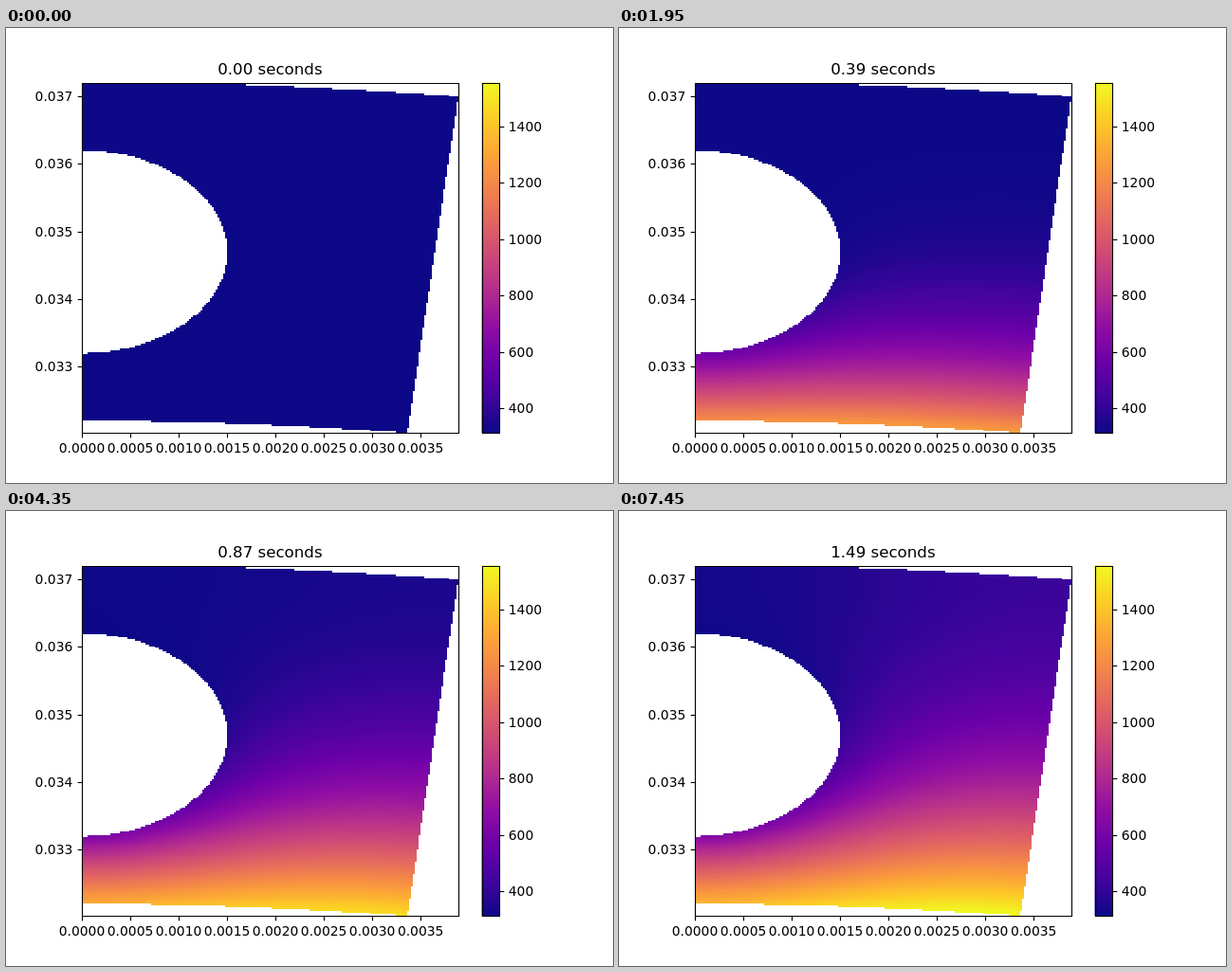
Animation of 640 by 480 pixels, one loop 7500 ms. Source, as an HTML page with a canvas:

```html
<!DOCTYPE html>
<html lang="en">
<head>
<meta charset="utf-8">
<title>Heat in a cooled wall</title>
<style>
  html, body { margin: 0; width: 100%; height: 100%; overflow: hidden; background: #fff; }
  canvas, svg { position: absolute; left: 0; top: 0; display: block; }
  text { font: 13.89px "DejaVu Sans", sans-serif; fill: #000; }
  #title { font-size: 16.67px; }
  path { fill: none; stroke: #000; stroke-width: 1.11; }
</style>
</head>
<body>
<canvas id="stage" width="640" height="480"></canvas>
<svg id="axes" width="640" height="480" viewBox="0 0 640 480"></svg>
<script>
const FRAMES = 150, STEP_MS = 50, LOOP_MS = FRAMES * STEP_MS;

// Wall segment in millimetres: a 6 degree wedge with a round cooling channel.
const R0 = 32.2, R1 = 37.2, WEDGE = Math.PI / 30;
const HOLE_Y = 34.7, HOLE_R = 1.5;
const ALPHA = 3.4, HOT = 0.5, COLD = 2.5;
const X_MAX = R1 * Math.sin(WEDGE), Y_MIN = R0 * Math.cos(WEDGE), Y_SPAN = R1 - Y_MIN;

// Plot box and colour bar in pixels.
const BOX = { x: 80, y: 57.6, w: 396.8, h: 369.6 };
const BAR = { x: 501.6, w: 18.48 };
const T_MIN = 313, T_MAX = 1555;

const PLASMA = [
  [13, 8, 135], [65, 4, 157], [106, 0, 168], [143, 13, 164], [177, 42, 144], [204, 71, 120],
  [225, 100, 98], [242, 132, 75], [252, 166, 54], [252, 206, 37], [240, 249, 33]
];
const lut = Array.from({ length: 256 }, (_, i) => {
  const p = i / 255 * 10, k = Math.min(9, Math.floor(p));
  return PLASMA[k].map((c, n) => Math.round(c + (PLASMA[k + 1][n] - c) * (p - k)));
});

// Heat equation on a polar grid with one row of border cells.
const NR = 100, NT = 64, ROW = NT + 2, SIZE = (NR + 2) * ROW;
const DR = (R1 - R0) / NR, DT = WEDGE / NT, SUB = 60;

function cellAt(i, j) {
  const r = R0 + (i - 0.5) * DR, a = (j - 0.5) * DT;
  const x = r * Math.sin(a), y = r * Math.cos(a) - HOLE_Y, d = Math.hypot(x, y);
  return {
    r, gap: d - HOLE_R,
    nr: Math.abs(x * Math.sin(a) + y * Math.cos(a)) / d,
    nt: Math.abs(x * Math.cos(a) - y * Math.sin(a)) / d
  };
}

const isSolid = (i, j) =>
  i > 0 && i <= NR && j > 0 && j <= NT && cellAt(i, j).gap > 0;

function simulate() {
  const [down, up, left, right, loss, gain] =
    Array.from({ length: 6 }, () => new Float64Array(SIZE));
  const cells = [], ghosts = [];
  const dt = 0.01 / SUB;

  for (let i = 1; i <= NR; i++) for (let j = 1; j <= NT; j++) {
    const k = i * ROW + j;
    if (!isSolid(i, j)) {
      const near = [];
      for (let a = -1; a <= 1; a++) for (let b = -1; b <= 1; b++)
        if (isSolid(i + a, j + b)) near.push(k + a * ROW + b);
      if (near.length) ghosts.push({ k, near });
      continue;
    }
    cells.push(k);
    const c = cellAt(i, j), side = c.r * DT;
    const wall = ALPHA * COLD / (1 + COLD * c.gap);
    const link = (rates, a, b, rate, sink) => {
      const ni = i + a, nj = j + b;
      if (ni < 1 || ni > NR || nj < 1 || nj > NT) return;
      if (isSolid(ni, nj)) rates[k] = rate * dt;
      else loss[k] += sink * dt;
    };
    link(down, -1, 0, ALPHA * (c.r - DR / 2) / (c.r * DR * DR), wall * c.nr / DR);
    link(up, 1, 0, ALPHA * (c.r + DR / 2) / (c.r * DR * DR), wall * c.nr / DR);
    link(left, 0, -1, ALPHA / (side * side), wall * c.nt / side);
    link(right, 0, 1, ALPHA / (side * side), wall * c.nt / side);
    if (i === 1) {
      gain[k] = ALPHA * HOT / (1 + HOT * DR / 2) / DR * dt;
      loss[k] += gain[k];
    }
  }

  // Values just outside the material, used only for smooth sampling.
  function extend(u) {
    for (const g of ghosts) {
      let sum = 0;
      for (const n of g.near) sum += u[n];
      u[g.k] = sum / g.near.length * (1 - COLD * DR);
    }
    for (let j = 1; j <= NT; j++) {
      u[j] = 2 * u[ROW + j] - u[2 * ROW + j];
      u[(NR + 1) * ROW + j] = u[NR * ROW + j];
    }
    for (let i = 0; i <= NR + 1; i++) {
      u[i * ROW] = u[i * ROW + 1];
      u[i * ROW + NT + 1] = u[i * ROW + NT];
    }
  }

  let u = new Float64Array(SIZE), v = new Float64Array(SIZE);
  const order = Int32Array.from(cells), count = order.length;
  const shots = [new Float32Array(SIZE)];
  while (shots.length < FRAMES) {
    for (let s = 0; s < SUB; s++) {
      for (let n = 0; n < count; n++) {
        const k = order[n], t = u[k];
        v[k] = t + down[k] * (u[k - ROW] - t) + up[k] * (u[k + ROW] - t)
          + left[k] * (u[k - 1] - t) + right[k] * (u[k + 1] - t) - loss[k] * t + gain[k];
      }
      [u, v] = [v, u];
    }
    extend(u);
    shots.push(Float32Array.from(u));
  }
  let peak = 0;
  for (const k of cells) peak = Math.max(peak, u[k]);
  return { shots, peak };
}

// The picture is a 200 by 200 raster of the field.
const N = 200;
function makeSamples() {
  const list = [];
  for (let row = 0; row < N; row++) for (let col = 0; col < N; col++) {
    const x = (col + 0.5) / N * X_MAX, y = R1 - (row + 0.5) / N * Y_SPAN;
    const r = Math.hypot(x, y), a = Math.atan2(x, y);
    if (r < R0 || r > R1 || a > WEDGE || Math.hypot(x, y - HOLE_Y) < HOLE_R) continue;
    const fi = (r - R0) / DR + 0.5, fj = a / DT + 0.5;
    const i = Math.floor(fi), j = Math.floor(fj);
    list.push({ at: (row * N + col) * 4, k: i * ROW + j, p: fi - i, q: fj - j });
  }
  return list;
}

// Axes, ticks and labels.
const axes = document.getElementById("axes");
function add(tag, attrs, content = "") {
  const el = document.createElementNS("http://www.w3.org/2000/svg", tag);
  for (const name in attrs) el.setAttribute(name, attrs[name]);
  el.textContent = content;
  axes.append(el);
  return el;
}
const snap = v => Math.floor(v + 0.5) + 0.5;
const label = (x, y, anchor, s) => add("text", { x, y, "text-anchor": anchor }, s);
function frame(x, w) {
  const l = snap(x), r = snap(x + w), t = snap(BOX.y), b = snap(BOX.y + BOX.h);
  add("path", { d: `M${l} ${t}H${r}V${b}H${l}Z` });
}
const bottom = BOX.y + BOX.h;

frame(BOX.x, BOX.w);
frame(BAR.x, BAR.w);
for (let n = 0; n < 8; n++) {
  const x = BOX.x + n * 0.5 / X_MAX * BOX.w;
  add("path", { d: `M${snap(x)} 427.5v4.86` });
  label(x, 448, "middle", (n * 0.0005).toFixed(4));
}
for (let mm = 33; mm <= 37; mm++) {
  const y = bottom - (mm - Y_MIN) / Y_SPAN * BOX.h;
  add("path", { d: `M80.5 ${snap(y)}h-4.86` });
  label(70.3, Math.round(y + 5), "end", (mm / 1000).toFixed(3));
}
for (let t = 400; t <= 1400; t += 200) {
  const y = bottom - (t - T_MIN) / (T_MAX - T_MIN) * BOX.h;
  add("path", { d: `M520.5 ${snap(y)}h4.86` });
  label(529.8, Math.round(y + 5), "start", t);
}
const title = add("text", { id: "title", x: 278.4, y: 49, "text-anchor": "middle" });

// Field drawing.
const ctx = document.getElementById("stage").getContext("2d");
const raster = document.createElement("canvas");
raster.width = raster.height = N;
const rctx = raster.getContext("2d"), image = rctx.createImageData(N, N);
const { shots, peak } = simulate();
const samples = makeSamples();

ctx.imageSmoothingEnabled = false;
const ramp = ctx.createLinearGradient(0, bottom, 0, BOX.y);
PLASMA.forEach((c, i) => ramp.addColorStop(i / 10, `rgb(${c})`));
ctx.fillStyle = ramp;
ctx.fillRect(BAR.x, BOX.y, BAR.w, BOX.h);

function draw(n) {
  const u = shots[n], px = image.data;
  for (const { at, k, p, q } of samples) {
    const low = u[k] + (u[k + 1] - u[k]) * q;
    const high = u[k + ROW] + (u[k + ROW + 1] - u[k + ROW]) * q;
    const t = (low + (high - low) * p) / peak;
    const c = lut[Math.max(0, Math.min(255, Math.floor(t * 256)))];
    px[at] = c[0];
    px[at + 1] = c[1];
    px[at + 2] = c[2];
    px[at + 3] = 255;
  }
  rctx.putImageData(image, 0, 0);
  ctx.clearRect(BOX.x - 1, BOX.y - 1, BOX.w + 2, BOX.h + 2);
  ctx.drawImage(raster, BOX.x, BOX.y, BOX.w, BOX.h);
  title.textContent = (n / 100).toFixed(2) + " seconds";
}

let shown = 0;
draw(0);
const start = performance.now();
function tick() {
  const n = Math.floor((performance.now() - start) % LOOP_MS / STEP_MS);
  if (n !== shown) draw(shown = n);
  requestAnimationFrame(tick);
}
requestAnimationFrame(tick);
</script>
</body>
</html>
```
